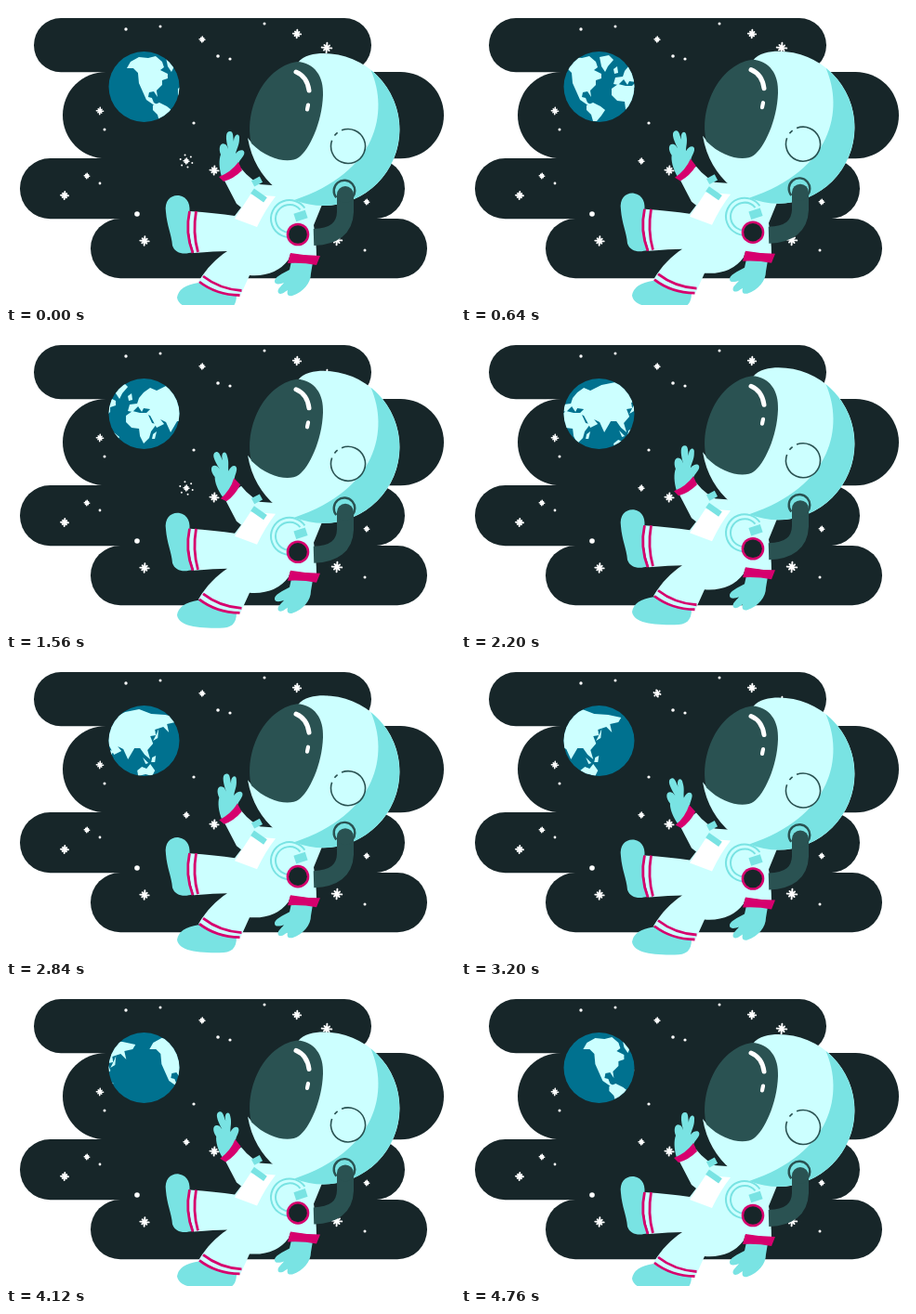
Recreate the animation shown at these times as an HTML page with a canvas. Size 483x322 px, loop 4.8 s.

```html
<!DOCTYPE html>
<html lang="en">
<head>
<meta charset="utf-8">
<title>Floating astronaut</title>
<style>
html, body { margin: 0; width: 100%; height: 100%; overflow: hidden; background: #fff; }
canvas { display: block; }
</style>
</head>
<body>
<canvas id="stage" width="483" height="322"></canvas>
<script>
const ctx = document.getElementById('stage').getContext('2d');
const LOOP = 4800, TAU = Math.PI * 2;
const SPACE = '#172629', LIGHT = '#ccffff', AQUA = '#79e3e3', GLASS = '#2a5252',
  PINK = '#d6006e', SEA = '#00718f', WHITE = '#fff';

const fill = (d, color) => { ctx.fillStyle = color; ctx.fill(new Path2D(d)); };
const stroke = (d, color, width, cap = 'butt') => {
  ctx.strokeStyle = color; ctx.lineWidth = width; ctx.lineCap = cap;
  ctx.stroke(new Path2D(d));
};
const disc = (x, y, r, color) => {
  ctx.fillStyle = color; ctx.beginPath(); ctx.arc(x, y, r, 0, TAU); ctx.fill();
};
const arc = (x, y, r, from, to, color, width) => {
  ctx.strokeStyle = color; ctx.lineWidth = width; ctx.lineCap = 'butt';
  ctx.beginPath(); ctx.arc(x, y, r, from * TAU / 360, to * TAU / 360); ctx.stroke();
};
const tilted = (x, y, degrees, draw) => {
  ctx.save(); ctx.translate(x, y); ctx.rotate(degrees * TAU / 360); draw(); ctx.restore();
};
const patch = (x, y, w, h, degrees) => tilted(x, y, degrees, () => {
  ctx.fillStyle = AQUA; ctx.fillRect(-w / 2, -h / 2, w, h);
});
const smooth = s => s * s * (3 - 2 * s);

// left, top, right, bottom
const bars = [[30, 13, 393, 71], [61, 71, 471, 164], [15, 164, 429, 229], [91, 229, 453, 293]];

const dots = [[129, 25, 1.7], [166, 22, 1.5], [278, 19, 1.5], [228, 54, 1.8], [241, 57, 1.6],
  [106, 133, 1.5], [202, 126, 1.6], [101, 191, 1.4], [141, 224, 2.8], [386, 263, 1.5]];

// x, y, size, then flare size and the times at which it flares
const stars = [
  { x: 211, y: 36, r: 2.9, flare: 7, times: [180, 1610, 3040] },
  { x: 194, y: 167, r: 2.9, flare: 7, times: [-60, 1480, 3020] },
  { x: 63, y: 204, r: 4, flare: 12, times: [1040] },
  { x: 313, y: 30, r: 4.2 }, { x: 345, y: 45, r: 5.3 }, { x: 101, y: 113, r: 3.6 },
  { x: 224, y: 177, r: 4.6 }, { x: 87, y: 183, r: 2.7 }, { x: 149, y: 253, r: 4.7 },
  { x: 388, y: 211, r: 2.7 }, { x: 356, y: 252, r: 5.3 }
];

const GLOBE = { x: 148.5, y: 87, r: 38, map: 172 };
const lands = [
  // North and Central America
  'M130 67L134 60L143 55L153 56L161 54L168 60L170 66L166 69L174 73L174 78L168 80L168 85L162 91L163 98L159 92L154 93L153 98L157 99L159 104L164 107L161 108L151 101L147 92L143 83L142 72L137 67Z',
  // Greenland
  'M172 55L182 53L187 58L181 65L178 71L174 65Z',
  // South America
  'M158 107L165 104L173 108L178 112L174 118L169 124L165 124L163 117L158 112Z',
  // Africa
  'M185 89L192 84L200 86L208 86L213 97L218 98L212 106L210 113L204 119L200 111L199 103L191 102L185 96Z',
  'M214 109L218 106L216 114L213 114Z',
  // Europe and Asia
  'M187 84L189 77L197 76L199 70L204 64L211 59L218 62L230 56L245 53L258 58L273 59L287 62L284 67L275 69L277 78L271 72L262 75L263 81L257 82L260 90L254 97L257 107L251 102L246 95L240 95L233 107L228 96L222 93L226 98L218 102L211 89L206 87L211 82L204 81L202 85L198 79L192 85Z',
  'M187 68L191 65L192 72L188 73Z',
  // islands and Australia
  'M264 79L266 74L265 84L260 87Z',
  'M249 105L255 111L252 112ZM259 105L263 103L262 110L258 110Z',
  'M243 119L248 115L253 117L257 112L262 119L259 125L252 123L244 125Z'
].map(d => new Path2D(d));

function drawStar({ x, y, r, flare, times = [] }, t) {
  const FLASH = 170;
  const start = times.find(s => t >= s && t < s + FLASH);
  ctx.strokeStyle = WHITE; ctx.lineCap = 'round';
  ctx.lineWidth = r > 3.8 ? 1.9 : 1.6;
  ctx.beginPath();
  for (let i = 0; i < 4; i++) {
    const a = i * TAU / 8 + .08, k = i % 2 ? .75 : 1;
    const dx = Math.cos(a) * r * k, dy = Math.sin(a) * r * k;
    ctx.moveTo(x - dx, y - dy);
    ctx.lineTo(x + dx, y + dy);
  }
  ctx.stroke();
  if (start === undefined) return;
  const reach = r + (flare - r) * Math.sin((t - start) / FLASH * Math.PI);
  for (let i = 0; i < 6; i++) {
    const a = i * TAU / 6 + .3;
    disc(x + Math.cos(a) * reach, y + Math.sin(a) * reach, 1, WHITE);
  }
}

function drawGlobe(t) {
  const { x, y, r, map } = GLOBE;
  disc(x, y, r, SEA);
  ctx.save();
  ctx.beginPath(); ctx.arc(x, y, r, 0, TAU); ctx.clip();
  ctx.translate(-map * t / LOOP, 0);
  ctx.fillStyle = LIGHT;
  for (let i = -1; i < 2; i++) {
    ctx.save();
    ctx.translate(i * map, 0);
    lands.forEach(land => ctx.fill(land));
    ctx.restore();
  }
  ctx.restore();
}

function drawBody() {
  fill('M307 261L305 270C298 274 288 278 289 283C290 287 296 285 299 284C296 288 291 291 293 295C296 298 301 293 303 292C302 296 303 299 308 298C320 294 328 284 328 274L330 262Z', AQUA);
  fill('M172 208C170 195 178 189 186 190C196 192 199 200 197 212Q192 232 201 251C192 254 182 253 179 244C178 232 173 222 172 208Z', AQUA);
  fill('M207 284Q186 287 184 300C186 312 205 314 230 314C242 314 248 310 248 297Q225 296 207 284Z', AQUA);
  fill('M272 178L246 212Q225 209 198 207Q194 230 202 252Q225 250 238 250C226 258 216 268 207 283Q228 298 252 298L262 276Q290 278 304 259L306 253L334 256Q334 240 331 222L342 195L300 180Z', LIGHT);
  stroke('M197.5 207Q192.5 230 201 252M204.5 207Q200.5 230 206.5 251', PINK, 2.8);
  stroke('M212 277Q230 291 253.5 292.5M208 283Q226 297 251.5 297.5', PINK, 2.8);
  fill('M306 252Q322 255 338 255L334 265Q319 262 303 263Z', PINK);
}

function drawWave(angle) {
  fill('M235 174L253 161Q263 174 282 183L262 210L248 199Z', LIGHT);
  tilted(243, 167, angle, () => {
    ctx.translate(-243, -167);
    fill('M232 170C229 160 229 151 231 146C228 138 231 132 236 135C238 136 238 138 239 140C236 128 236 121 241 121C245 121 244 127 245 132C245 123 252 122 251 129C251 136 248 140 247 145C252 139 258 141 256 146C253 152 250 152 249 160Z', AQUA);
    fill('M229 170Q242 165 250 154L254 163Q245 172 234 175Z', PINK);
  });
}

function drawChest() {
  fill('M263 189L290 191Q279 205 270 224L246 215Z', WHITE);
  patch(270, 175, 10, 7, -28);
  patch(272, 190, 17, 6.5, 35);
  arc(305, 215, 20, 70, 325, AQUA, 2);
  arc(305, 215, 15, 80, 320, AQUA, 2);
  patch(317, 212, 13, 9, -18);
}

function drawHelmet() {
  fill('M314 47C320 39 332 37 341.5 37A82 82 0 0 1 341.5 201C305 201 268 175 260 128L265 134Z', LIGHT);
  fill('M392.5 55C412 100 400 165 310 195Q326 201 341.5 201A82 82 0 0 0 392.5 55Z', AQUA);
  fill('M313 46C332 47 342 62 341 82C340 112 326 141 315 149C305 156 282 152 264 134C256 100 276 52 313 46Z', GLASS);
  stroke('M312 57Q324 62 326 77', WHITE, 5, 'round');
  tilted(324.5, 95, 12, () => stroke('M0 -2.5V2.5', WHITE, 4.2, 'round'));
  arc(368, 137, 18.5, -112, 200, GLASS, 1.6);
  arc(368, 137, 18.5, -142, -128, GLASS, 1.6);
}

function drawHose() {
  stroke('M365 189V208Q364 234 331 235', GLASS, 18);
  disc(365, 189, 9, GLASS);
  arc(364, 185, 11.3, 140, 400, GLASS, 2.4);
  disc(314, 232, 12.3, PINK);
  disc(314, 232, 9.8, SPACE);
}

function draw(t) {
  ctx.fillStyle = WHITE;
  ctx.fillRect(0, 0, 483, 322);
  ctx.fillStyle = SPACE;
  for (const [left, top, right, bottom] of bars) {
    ctx.beginPath();
    ctx.roundRect(left, top, right - left, bottom - top + .3, (bottom - top) / 2);
    ctx.fill();
  }
  dots.forEach(([x, y, r]) => disc(x, y, r, WHITE));
  stars.forEach(star => drawStar(star, t));
  drawGlobe(t);

  const phase = TAU * t / LOOP;
  ctx.save();
  ctx.translate(0, 7 + 7 * Math.cos(phase));
  drawBody();
  drawWave(-22 * smooth((1 - Math.cos(phase * 2)) / 2));
  drawChest();
  drawHelmet();
  drawHose();
  ctx.restore();
}

const begin = performance.now();
function tick() {
  draw((performance.now() - begin) % LOOP);
  requestAnimationFrame(tick);
}
tick();
</script>
</body>
</html>
```
